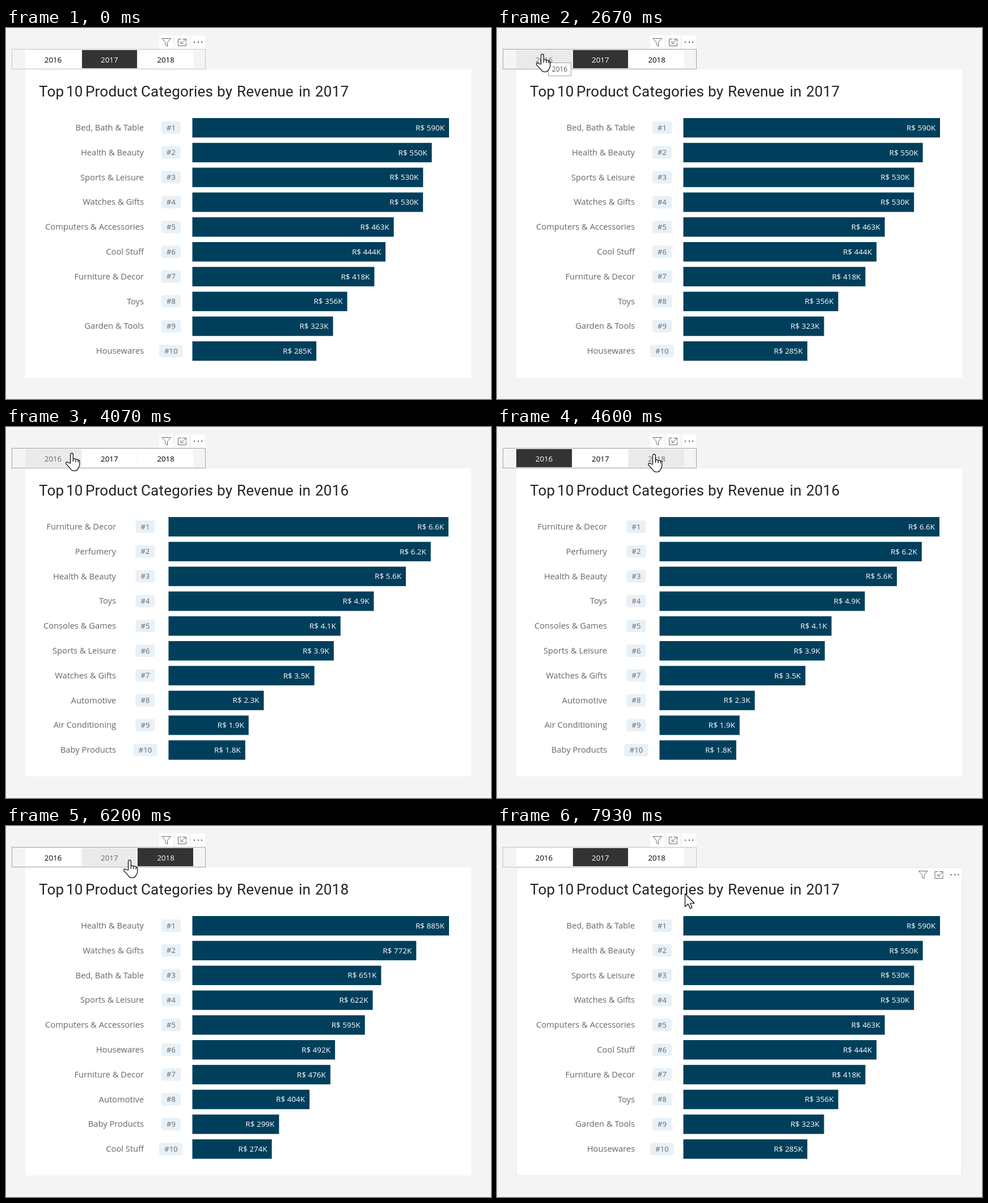
Write an HTML page with a canvas that moves like this. It is 855x655 px and loops after 8000 ms.

```html
<!DOCTYPE html>
<html lang="en">
<head>
<meta charset="utf-8">
<title>Top 10 Product Categories</title>
<style>
  html, body { margin: 0; width: 100%; height: 100%; overflow: hidden; background: #f4f4f4; }
  canvas { display: block; }
</style>
</head>
<body>
<canvas id="stage" width="855" height="655"></canvas>
<script>
const ctx = document.getElementById('stage').getContext('2d');
const LOOP = 8000, STEP = 200 / 3;
const SANS = '"Open Sans", "Noto Sans", sans-serif';
const TITLE = 'Roboto, "Open Sans", sans-serif';

// Each chart: right edge of labels, badge centre, bar start and end, rows.
const wide = { label: 243, badge: 291, bar: 328.5, end: 781, digits: 0 };
const charts = {
  2016: {
    label: 194, badge: 245.5, bar: 286.5, end: 780, digits: 1,
    rows: [['Furniture & Decor', 6.64], ['Perfumery', 6.22], ['Health & Beauty', 5.63],
      ['Toys', 4.87], ['Consoles & Games', 4.08], ['Sports & Leisure', 3.92],
      ['Watches & Gifts', 3.46], ['Automotive', 2.26], ['Air Conditioning', 1.9],
      ['Baby Products', 1.82]]
  },
  2017: {
    ...wide,
    rows: [['Bed, Bath & Table', 590], ['Health & Beauty', 550.4], ['Sports & Leisure', 530.4],
      ['Watches & Gifts', 530.2], ['Computers & Accessories', 463], ['Cool Stuff', 444],
      ['Furniture & Decor', 418.4], ['Toys', 356], ['Garden & Tools', 323.4],
      ['Housewares', 285]]
  },
  2018: {
    ...wide,
    rows: [['Health & Beauty', 885], ['Watches & Gifts', 772], ['Bed, Bath & Table', 651],
      ['Sports & Leisure', 622], ['Computers & Accessories', 595], ['Housewares', 492],
      ['Furniture & Decor', 476], ['Automotive', 404], ['Baby Products', 299],
      ['Cool Stuff', 274]]
  }
};

const tabs = [[2016, 34, 98], [2017, 134, 97], [2018, 232, 98]];

// Pointer keys: time, x, y. Hidden before the first.
const path = [
  [1866, 21, 81], [2200, 80, 46], [3866, 80, 46], [4600, 277, 48], [4733, 283, 50],
  [4866, 273, 51], [5866, 273, 51], [6200, 218, 60], [6400, 208, 60],
  [7333, 208, 60], [7933, 331, 119]
];

// Tooltips: start, end, year.
const tips = [[2660, 2860, 2016], [3460, 3930, 2016], [6795, 6995, 2017]];

const arrow = new Path2D('M.5.5V23.5L5.8 18.6L9.3 26.6L13 25L9.7 17.5H17Z');
const hand = new Path2D(
  'M-2.5 18V2.6a2.4 2.4 0 0 1 4.8 0V10.5q2.4-1.6 4.7.7q2.6-1 4.2 1q2.4-.2 2.6 2.6' +
  'V20q0 4-2.6 7q-1.5 4.5-6.7 4.5q-5 0-7-4.2L-10 19.2q-1.2-2.6 1.2-3.3q1.5-.3 3 1.1Z' +
  'M2.3 10.5V15.5M7 11.2V16M11.2 12.2V16.5');
const funnel = new Path2D('M275 18.5H290.5L284.5 25.5V32L281 29.5V25.5Z');
const focus = new Path2D('M309 19.5H303.5V31.5H317.5V26M311 19.5H317.5V24.5M317 20L310 26.5M308.5 23.5V27.5H312.5');

function rect(x, y, w, h, color) {
  ctx.fillStyle = color;
  ctx.fillRect(x, y, w, h);
}

function frame(x, y, w, h, color) {
  ctx.strokeStyle = color;
  ctx.lineWidth = 1;
  ctx.strokeRect(x + .5, y + .5, w - 1, h - 1);
}

function text(str, x, y, size, color, align = 'left', family = SANS) {
  ctx.font = `${size}px ${family}`;
  ctx.textAlign = align;
  ctx.fillStyle = color;
  ctx.fillText(str, x, y);
}

function pointerAt(t) {
  if (t < path[0][0]) return null;
  let i = path.findIndex(k => k[0] > t);
  if (i < 0) return path[path.length - 1].slice(1);
  const [t0, x0, y0] = path[i - 1], [t1, x1, y1] = path[i];
  const u = (t - t0) / (t1 - t0), e = u * u * (3 - 2 * u);
  return [x0 + (x1 - x0) * e, y0 + (y1 - y0) * e];
}

const yearAt = (t, a, b, c) => t < a ? 2017 : t < b ? 2016 : t < c ? 2018 : 2017;

const inside = (p, x, y, w, h) =>
  !!p && p[0] >= x && p[0] < x + w && p[1] >= y && p[1] < y + h;

function drawTools(dx, dy) {
  ctx.save();
  ctx.translate(dx, dy);
  for (const x of [270, 298, 326]) rect(x, 13, 25, 24, '#fff');
  ctx.strokeStyle = '#666';
  ctx.lineWidth = 1;
  ctx.stroke(funnel);
  ctx.stroke(focus);
  for (const x of [331, 338, 344]) rect(x, 24, 2, 2, '#555');
  ctx.restore();
}

function drawTabs(selected, pointer) {
  const over = inside(pointer, 10, 37, 342, 36);
  frame(10, 37, 342, 36, over ? '#a3a3a3' : '#c6c6c6');
  for (const [year, x, w] of tabs) {
    const hover = over && inside(pointer, x - 1, 37, w + 2, 36);
    const on = year === selected;
    rect(x, 39, w, 32, hover ? '#eaeaea' : on ? '#333' : '#fff');
    text(year, 83 + (year - 2016) * 99.3, 61, 13.3,
      hover ? '#666' : on ? '#fff' : '#000', 'center');
  }
}

function drawChart(year) {
  const words = ['Top', '10', 'Product', 'Categories', 'by', 'Revenue', 'in', year];
  const starts = [58, 106, 140, 238, 372, 407, 516, 545];
  ctx.letterSpacing = '0.2px';
  words.forEach((word, i) => text(word, starts[i], 121, 26, '#222', 'left', TITLE));
  ctx.letterSpacing = '0px';

  const { label, badge, bar, end, digits, rows } = charts[year];
  const scale = (end - bar) / rows[0][1];
  rows.forEach(([name, value], i) => {
    const y = 176 + i * 43.8, w = i < 9 ? 34 : 42, right = bar + value * scale;
    text(name, label, y + 5, 14.7, '#666', 'right');
    ctx.fillStyle = '#e8f1f8';
    ctx.beginPath();
    ctx.roundRect(badge - w / 2, y - 11, w, 22, 4);
    ctx.fill();
    text('#' + (i + 1), badge, y + 4.5, 13, '#666', 'center');
    rect(bar, y - 17, right - bar, 34.3, '#003f5c');
    text(`R$ ${value.toFixed(digits)}K`, right - 8, y + 4.7, 13.5, '#fff', 'right');
  });
}

function drawPointer([x, y], shape) {
  ctx.save();
  ctx.translate(Math.round(x), Math.round(y));
  ctx.fillStyle = '#fff';
  ctx.strokeStyle = '#000';
  ctx.lineWidth = 1.2;
  ctx.lineJoin = 'round';
  ctx.fill(shape);
  ctx.stroke(shape);
  ctx.restore();
}

function draw(now) {
  // The screen updates fifteen times a second.
  const t = Math.floor((now % LOOP + 5) / STEP) * STEP;
  const pointer = pointerAt(t);
  rect(0, 0, 855, 655, '#f4f4f4');
  rect(34, 73, 786, 544, '#fff');
  drawTools(0, 0);
  drawTabs(yearAt(t, 2860, 5195, 6995), pointer);
  if (inside(pointer, 34, 73, 786, 544)) {
    frame(34, 73, 786, 545, '#e6e6e6');
    drawTools(468.5, 61);
  }
  drawChart(yearAt(t, 2995, 5260, 7195));

  const tip = tips.find(([a, b]) => t >= a && t < b);
  if (tip) {
    const x = Math.round(pointer[0]) + 10, y = Math.round(pointer[1]) + 15;
    rect(x, y, 41, 24, '#fff');
    frame(x, y, 41, 24, '#a0a0a0');
    text(tip[2], x + 20.5, y + 16, 12, '#575757', 'center');
  }
  if (pointer) drawPointer(pointer, inside(pointer, 33, 37, 298, 36) ? hand : arrow);
}

const start = performance.now();
function tick() {
  draw(performance.now() - start);
  requestAnimationFrame(tick);
}
tick();
</script>
</body>
</html>
```
